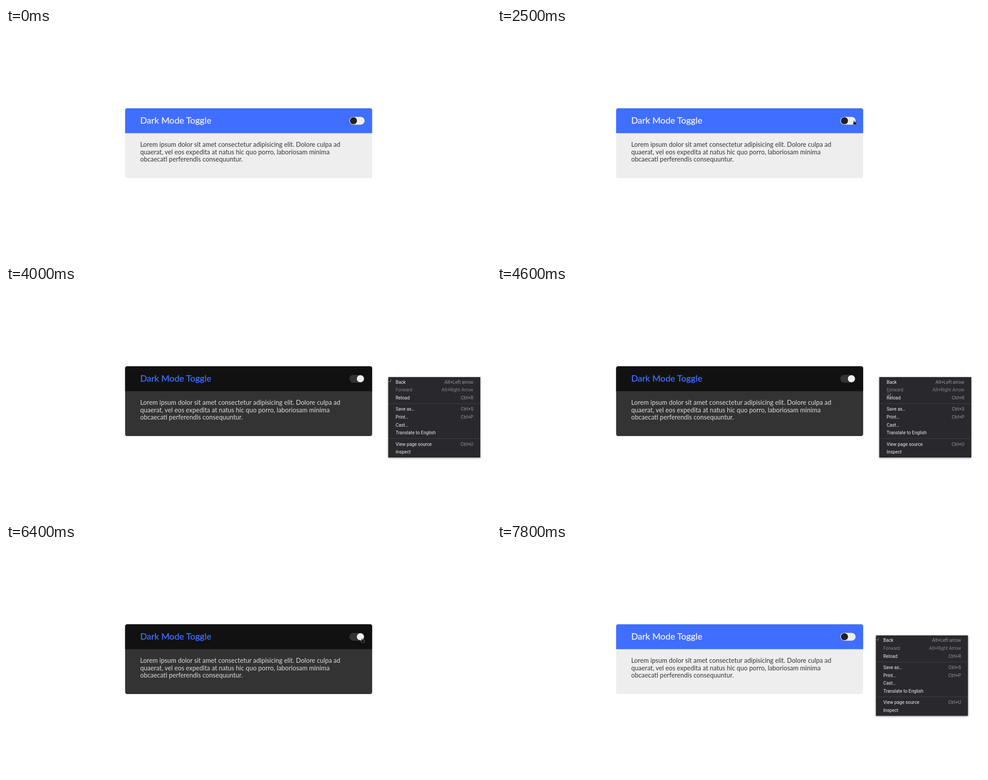
Write an HTML page that moves like this. It is 1086x515 px and loops after 8 s.

```html
<!DOCTYPE html>
<html lang="en">
<head>
<meta charset="utf-8">
<title>Dark Mode Toggle</title>
<style>
  html, body { margin: 0; width: 100%; height: 100%; overflow: hidden; background: #fff; }
  svg { display: block; --head: #406eff; --title: #eee; --panel: #eee; --ink: #222; --track: #eee; --knob: #222; }
  svg.dark { --head: #111; --title: #406eff; --panel: #333; --ink: #eee; --track: #333; --knob: #f0f0f0; }
  .title { font: 19.9px Lato, sans-serif; fill: var(--title); stroke: var(--title); stroke-width: .35px; }
  .copy { font: 14.4px Lato, sans-serif; fill: var(--ink); fill-opacity: .9; }
  #menu { font: 10.25px Roboto, sans-serif; fill: #eeeef0; }
  #menu .box { fill: #29282d; filter: drop-shadow(0 1px 2px #0007); }
  #menu .key { text-anchor: end; fill: #98989c; }
  #menu .off { fill: #828287; }
  #menu .line { fill: #404045; }
  #cursor { fill: #111; stroke: #fff; stroke-width: .9px; stroke-linejoin: round; paint-order: stroke; }
</style>
</head>
<body>
<svg id="stage" width="1086" height="515" viewBox="0 0 1086 515">
  <rect x="266.7" y="179.7" width="553.2" height="156.3" rx="4.5" fill="var(--panel)"/>
  <path d="M266.7 235.6V184.2a4.5 4.5 0 0 1 4.5-4.5H815.4a4.5 4.5 0 0 1 4.5 4.5V235.6Z" fill="var(--head)"/>
  <text class="title" x="300.5" y="214">Dark Mode Toggle</text>
  <g class="copy">
    <text x="300.5" y="266">Lorem ipsum dolor sit amet consectetur adipisicing elit. Dolore culpa ad</text>
    <text x="300.5" y="282.5">quaerat, vel eos expedita at natus hic quo porro, laboriosam minima</text>
    <text x="300.5" y="299">obcaecati perferendis consequuntur.</text>
  </g>
  <rect x="768.8" y="199" width="34.2" height="17.4" rx="8.7" fill="var(--track)"/>
  <circle id="knob" cy="207.7" r="7.9" fill="var(--knob)"/>
  <g id="menu">
    <rect class="box" width="206" height="180"/>
    <rect id="hover" width="206" height="17.6" fill="#4a4a4f"/>
  </g>
  <g id="cursor">
    <path id="arrow" d="M0 0V8.8L2 7 3.5 10.3 4.9 9.7 3.5 6.5H6Z"/>
    <path id="hand" d="M-.8 .9Q0-.2 .8 .9V3.4L4.8 4.2Q6 4.7 5.6 6.6L5 9.4H0L-2.8 5.8Q-2.6 4.5-.8 5.8Z"/>
  </g>
</svg>
<script>
const $ = id => document.getElementById(id);
const LOOP = 8000, ROW = 17.6, GAP = 7.9;
const DARK = [2700, 6800];
const MENUS = [[4000, 4900], [7800, LOOP]];

// Each move: start time, end time, then where it leads
const pointer = {
  from: [885.5, 514.5],
  moves: [
    [600, 1500, 874.5, 321.5],
    [1500, 2400, 799.5, 207],
    [3300, 3900, 856, 205],
    [4300, 4700, 883, 246],
    [5600, 6200, 801, 212.5],
    [6300, 6500, 793, 210],
    [7000, 7700, 848.5, 205.7]
  ],
  ease: p => p
};
const knob = {
  from: [778],
  moves: [[2750, 3050, 793.5], [6700, 7000, 778]],
  ease: p => p * p * (3 - 2 * p)
};

const groups = [
  [['Back', 'Alt+Left arrow'], ['Forward', 'Alt+Right Arrow', 'off'], ['Reload', 'Ctrl+R']],
  [['Save as…', 'Ctrl+S'], ['Print…', 'Ctrl+P'], ['Cast…'], ['Translate to English']],
  [['View page source', 'Ctrl+U'], ['Inspect']]
];

function place({ from, moves, ease }, t) {
  let pos = from;
  for (const [start, end, ...to] of moves) {
    const p = ease(Math.min(1, Math.max(0, (t - start) / (end - start))));
    pos = pos.map((v, i) => v + (to[i] - v) * p);
  }
  return pos;
}

const snap = (t, step) => Math.floor(t / step) * step;
const within = (t, [start, end]) => t >= start && t < end;
const show = (el, on) => el.setAttribute('visibility', on ? 'visible' : 'hidden');
const move = (el, x, y) => el.setAttribute('transform', `translate(${x} ${y})`);

function add(name, attrs, text = '') {
  const el = document.createElementNS('http://www.w3.org/2000/svg', name);
  for (const key in attrs) el.setAttribute(key, attrs[key]);
  el.textContent = text;
  $('menu').append(el);
}

const rows = [];
function buildMenu() {
  let top = 2.2;
  groups.forEach((group, i) => {
    if (i) {
      add('rect', { class: 'line', y: Math.round(top + GAP / 2), width: 206, height: 1 });
      top += GAP;
    }
    for (const [label, key = '', state = ''] of group) {
      const y = top + 12.5;
      add('text', { x: 16.5, y, class: state }, label);
      add('text', { x: 190.5, y, class: 'key ' + state }, key);
      if (!state) rows.push(top);
      top += ROW;
    }
  });
}

function drawMenu(t, x, y) {
  const span = MENUS.find(m => within(t, m));
  show($('menu'), span);
  show($('hover'), false);
  if (!span) return;
  const [left, openY] = place(pointer, span[0]), top = openY - 1;
  move($('menu'), left, top);
  const row = rows.find(r => within(y - top, [r, r + ROW]));
  show($('hover'), row !== undefined);
  $('hover').setAttribute('y', row ?? 0);
}

function draw(time) {
  const t = snap(time % LOOP, 100);
  const [x, y] = place(pointer, t);
  $('stage').classList.toggle('dark', within(t, DARK));
  $('knob').setAttribute('cx', place(knob, snap(t, 200))[0]);
  drawMenu(t, x, y);

  const overSwitch = x < 803 && y < 212;
  move($('cursor'), x, y);
  show($('arrow'), !overSwitch);
  show($('hand'), overSwitch);
}

buildMenu();
const start = performance.now();
function tick() {
  draw(performance.now() - start);
  requestAnimationFrame(tick);
}
tick();
</script>
</body>
</html>
```
